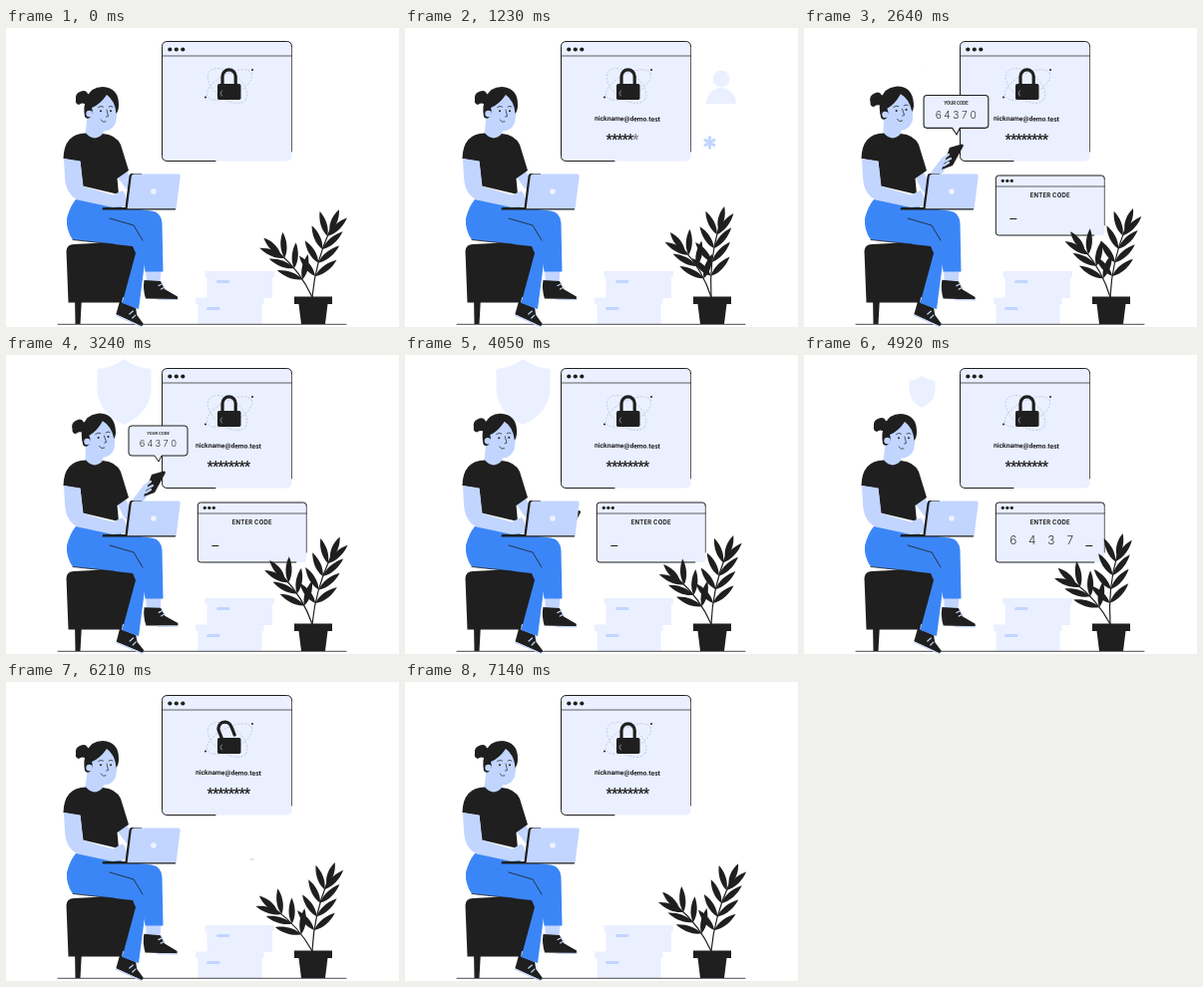
Recreate the animation shown at these times as an HTML page. Size 394x300 px, loop 7.17 s.

```html
<!DOCTYPE html>
<html lang="en">
<head>
<meta charset="utf-8">
<title>Two-step sign in</title>
<style>
  html, body { margin: 0; height: 100%; overflow: hidden; background: #fff; }
  svg { display: block; width: 100vw; height: 100vh; }
  text { font-family: Inter, Roboto, sans-serif; fill: #1f1f1f; text-anchor: middle; }
  .ink { fill: #1f1f1f; }
  .skin { fill: #c2d5ff; }
  .pale { fill: #eaf0ff; }
  .blue { fill: #3b86f7; }
  .line { fill: none; stroke: #1f1f1f; stroke-linecap: round; stroke-linejoin: round; }
  .trim { fill: none; stroke: #c2d5ff; stroke-linecap: round; }
  .orbit { fill: none; stroke: #a9b5d0; stroke-width: .6; stroke-dasharray: 2 1.5; }
  .bold { font-weight: 700; }
  .thin text { font-weight: 300; fill: #333; }
  #mail, #stars text { font-family: Roboto, Inter, sans-serif; }
</style>
</head>
<body>
<svg viewBox="0 0 394 300">
  <path id="shield" class="pale" d="M0-33Q12-24 27-23V-3Q26 21 0 33Q-26 21-27-3V-23Q-12-24 0-33Z"/>

  <!-- login window -->
  <rect class="pale" x="156.5" y="13.5" width="130" height="120" rx="5"/>
  <path class="line" d="M210 133.5H162Q156.5 133.5 156.5 128.5V18.5Q156.5 13.5 162 13.5H281.5Q286.5 13.5 286.5 18.5"/>
  <path class="line" stroke-width=".7" d="M286.5 18.5V124M157 28H286.5"/>
  <g class="ink">
    <circle cx="164.3" cy="21.5" r="2.1"/><circle cx="170.8" cy="21.5" r="2.1"/><circle cx="177.3" cy="21.5" r="2.1"/>
    <circle cx="247" cy="42" r="1"/><circle cx="200" cy="69.5" r="1"/>
  </g>
  <ellipse class="orbit" cx="224" cy="57" rx="25" ry="11" transform="rotate(-28 224 57)"/>
  <ellipse class="orbit" cx="222" cy="58" rx="23" ry="13" transform="rotate(38 222 58)"/>
  <path id="shackle" class="line" stroke-width="3.2" d="M217 58V48.5A6.6 6.6 0 0 1 230.2 48.5V58"/>
  <rect class="ink" x="212" y="56" width="23.5" height="16" rx="1.8"/>
  <path class="trim" stroke-width=".6" d="M216.5 63L215 65.5 216.5 68"/>
  <text id="mail" class="bold" x="223" y="93.3" font-size="6.7" transform="rotate(.8 223 91)">nickname@demo.test</text>
  <g id="stars" class="bold" font-size="14"></g>

  <!-- user badge and asterisks -->
  <g id="user" class="pale"><circle cy="-7" r="8.5"/><path d="M-15 18Q-14 3 0 2Q14 3 15 18Z"/></g>
  <g id="marks" stroke="#c2d5ff" stroke-width="3"></g>

  <!-- code window -->
  <g id="codeBox">
    <rect class="pale" x="-54.5" y="-30" width="109" height="60" rx="3"/>
    <path class="line" d="M44 30H-51.500Q-54.5 30-54.5 27V-27Q-54.5-30-51.5-30H51.5Q54.5-30 54.5-27"/>
    <path class="line" stroke-width=".7" d="M54.5-27V20M-54.5-19H54.5"/>
    <g class="ink"><circle cx="-47.5" cy="-24.7" r="1.6"/><circle cx="-43" cy="-24.7" r="1.6"/><circle cx="-38.5" cy="-24.7" r="1.6"/></g>
    <text class="bold" y="-8.3" font-size="5.9" letter-spacing=".25">ENTER CODE</text>
    <g id="digits" class="thin" font-size="11.8"></g>
    <path id="cursor" stroke="#1f1f1f" d="M-3.5 13.5H3.5"/>
  </g>

  <!-- boxes -->
  <g class="pale">
    <path d="M199.5 244H269V250H267V271H201.5V250H199.5Z"/>
    <path d="M190 270.5H258.5V277H256.5V297H192.5V277H190Z"/>
  </g>
  <path class="trim" stroke-width="3" d="M212.5 254.5H223M202.5 281.5H213"/>

  <!-- plant -->
  <g id="plant" class="ink" transform="translate(307 270)"></g>
  <path class="ink" d="M289 269.5H327V277H322.5L320 297H296L293.5 277H289Z"/>
  <path class="line" stroke="#555" stroke-width=".8" d="M52 297.3H341"/>

  <!-- stool -->
  <path class="ink" d="M69 270H76L74.5 297H69.5ZM60.5 224Q61 217 68 217L125 214 132 225 123 275.500H62.5Z"/>

  <!-- legs -->
  <g id="farFoot">
    <path class="skin" d="M140 242H155.5L154.5 257H141Z"/>
    <path class="ink" d="M138.500 253L155 254 159 262 172 269.5V272L140 271.5Q137 262 138.500 253Z"/>
    <path class="trim" stroke-width="1.2" d="M152 272.5H172M153 258.5L157 256.5M155.500 262L159 260"/>
  </g>
  <path class="blue" d="M100 178L146 183.5Q156 185 156.5 196L157.5 244.5H139.5L135 212 110 205Z"/>
  <g id="nearFoot">
    <path class="skin" d="M117 270L134 275 130 286 115 282Z"/>
    <path class="ink" d="M114 274.5L130 281 131.5 288 138 296.5 136.500 299 110.5 287.5Z"/>
    <path class="trim" stroke-width="1.2" d="M110.5 288.3L136 299.5M124 287L127.500 284M127 291L130 288"/>
  </g>
  <path class="blue" d="M70 172L112 175 128 194 137 213Q140 222 139 236L133 282 116.500 276 130 226 127 219 67 212.5Q60 203 61 191 64 179 70 172Z"/>
  <path class="line" stroke-width=".8" d="M67 212.5L108 217 129 225M104 191L128 198 137 213"/>

  <!-- far arm with phone -->
  <path id="arm" fill="none" stroke="#c2d5ff" stroke-linejoin="round" stroke-linecap="round"/>
  <g id="phone">
    <path class="ink" d="M4-13L16-16.500Q18.500-16.500 17.500-14L7 5-4 9Z"/>
    <path class="trim" stroke-width="2.2" d="M-4-1L3-6M-3 2L5-2M-2 5L3 2"/>
  </g>

  <!-- head -->
  <g id="head">
    <path class="skin" d="M82 86L98 98 97 109Q89 118 79 109Z"/>
    <path class="skin" d="M81 76Q94 62 109 70 113 82 110 95 106 104.500 96 103.500 85 100 80 88Z"/>
    <path class="ink" d="M79 89Q77 78 81 70 85 59 97 59 113 60 113 77 113 83 110.500 86 109.500 73 101 67 94 77 86 80 88 86 84 90 81 92 79 89Z"/>
    <path class="ink" d="M70 72Q69 66 74 64 80 61 82 66L85 67 81 77Q76 74 73 77 69 76 70 72Z"/>
    <circle class="skin" cx="83.5" cy="86" r="3.2"/>
    <g class="ink"><circle cx="95" cy="83.3" r="1"/><circle cx="105" cy="83.300" r="1"/></g>
    <path class="line" stroke-width=".7" d="M92.5 79.5Q95 77.5 97.5 79M103 79Q105 77.5 107 79M101 82L102.5 88.5 100.5 89M95 92Q97 95.5 100 94"/>
  </g>

  <path class="ink" d="M80 105.5Q89 115 97 106 110 107 115 117L123 143 111.5 151 113 167 77 158.5 74.5 134 57.5 131Q58 106 80 105.5Z"/>
  <path id="nearArm" class="skin"/>

  <!-- laptop -->
  <path class="ink" d="M126 146H136V182H97V180H119.5L123.5 149Q124 146 126 146Z"/>
  <path class="skin" d="M129 146.5H172.5Q175 146.5 174.7 149L170.5 182H121.5L125.7 149Q126 146.5 129 146.5Z"/>
  <path class="line" stroke-width="1.3" d="M97 181.8H169.5"/>
  <circle fill="#eef3ff" cx="148" cy="164" r="2.8"/>

  <!-- message bubble -->
  <g id="bubble">
    <path class="pale" stroke="#1f1f1f" d="M-27-36H26Q29-36 29-33V-9Q29-6 26-6H3L0 0-4-6H-27Q-30-6-30-9V-33Q-30-36-27-36Z"/>
    <text class="bold" x="-.5" y="-27.5" font-size="3.8">YOUR CODE</text>
    <g id="sms" class="thin" font-size="9.3"></g>
  </g>
</svg>
<script>
const LOOP = 7170, CODE = [...'64370'];
const $ = id => document.getElementById(id);
const set = (el, key, value) => el.setAttribute(key, value);
const fill = (id, html) => [...($(id).innerHTML = html, $(id).children)];
const row = (n, draw) => Array.from({ length: n }, (_, i) => draw(i)).join('');

const stars = fill('stars', row(8, i => `<text x="${204.8 + i * 5.3}" y="116.6">*</text>`));
const marks = fill('marks', row(3, () => '<path d="M0-6.5V6.5M-5.6-3.25L5.6 3.25M-5.6 3.25L5.6-3.25"/>'));
const digits = fill('digits', row(5, i => `<text x="${-37 + i * 19}" y="12.3">${CODE[i]}</text>`));
fill('sms', row(5, i => `<text x="${-16.5 + i * 7.9}" y="-15">${CODE[i]}</text>`));

const leaf = (x, y, angle, len) => `<path d="M0 0C4.500 ${-len * .3} 3.600 ${-len * .7} 0 ${-len}C-3.600 ${-len * .7} -4.500 ${-len * .3} 0 0"
  transform="translate(${x} ${-y}) rotate(${angle})"/>`;

// A stem that bows outward; side is 1 for a right-hand stem, -1 for a left-hand one.
const stem = (height, pairs, side) => '<g>' +
  `<path class="line" stroke-width="1.2" d="M0 0Q${-side * 6} ${-height / 2} 0 ${-height}"/>` +
  leaf(0, height - 2, side * 8, 24) +
  row(pairs, i => {
    const y = height - 7 - i * 14, u = y / height;
    const x = -side * 12 * u * (1 - u), tilt = side * 10 * (2 * u - 1);
    return leaf(x, y, tilt + side * (24 + 6 * i), 27) + leaf(x, y, tilt - side * (40 + 3 * i), 26);
  }) + '</g>';
const [leftStem, rightStem] = fill('plant', stem(55, 3, -1) + stem(70, 4, 1));

const part = (t, from, to) => Math.min(1, Math.max(0, (t - from) / (to - from)));
const smooth = u => u * u * (3 - 2 * u);
const back = u => 1 + 2.7 * (u - 1) ** 3 + 1.7 * (u - 1) ** 2;
// Ease in over [a, b], hold, then ease out over [c, d].
const hold = (ease, t, a, b, c, d) => ease(Math.min(part(t, a, b), 1 - part(t, c, d)));
const place = (el, x, y, s) => {
  set(el, 'transform', `translate(${x} ${y}) scale(${Math.max(0, s)})`);
  set(el, 'visibility', s > .002 ? 'visible' : 'hidden');
};
const turn = (el, angle, x = 0, y = 0) => set(el, 'transform', `rotate(${angle} ${x} ${y})`);

function draw(t) {
  const phase = t / LOOP * Math.PI * 2;

  turn(rightStem, 10.5 + 5 * Math.cos(2 * phase + .47));
  turn(leftStem, -35 + 7 * Math.sin(phase - .26));
  turn($('farFoot'), Math.sin(6 * phase), 147, 246);
  turn($('nearFoot'), Math.sin(6 * phase + 1), 124, 276);

  $('mail').style.opacity = part(t, 250, 550);
  stars.forEach((s, i) => s.style.opacity = part(t, 680 + i * 100, 780 + i * 100));
  turn($('shackle'), -22 * hold(smooth, t, 5400, 5700, 6600, 6900), 217, 58);

  place($('user'), 317, 58, hold(back, t, 500, 900, 2250, 2550));
  marks.forEach((m, i) => {
    const start = 950 + i * 320;
    place(m, 305.5 + i * 14.3, 115, hold(back, t, start, start + 280, 2250, 2550));
  });
  place($('shield'), 118.5, 37, hold(smooth, t, 2600, 3130, 4650, 5180));

  place($('codeBox'), 246.8, 178, hold(back, t, 1760, 2200, 5774, 6214));
  const typed = Math.min(5, Math.max(0, Math.floor((t - 4120) / 180)));
  digits.forEach((d, i) => set(d, 'visibility', i < typed ? 'inherit' : 'hidden'));
  set($('cursor'), 'transform', `translate(${-37 + typed * 19} 0)`);
  set($('cursor'), 'visibility', typed < 5 ? 'inherit' : 'hidden');

  // The hand swings out behind the laptop on its way up.
  const r = hold(smooth, t, 1850, 2400, 3700, 4250), q = 1 - r;
  const curve = (a, b, c) => q * q * a + 2 * q * r * b + r * r * c;
  const x = curve(147, 175, 142), y = curve(175, 168, 133);
  set($('arm'), 'd', `M115 145L${124 - 2 * r} ${157 + 3 * r}L${x - 3 * r} ${y + 4 * r}`);
  set($('arm'), 'stroke-width', 11 - 1.5 * r);
  set($('phone'), 'transform', `translate(${x} ${y + 6 * q})`);
  set($('phone'), 'visibility', r > .01 ? 'visible' : 'hidden');
  turn($('head'), -6 * r, 91, 106);
  place($('bubble'), 153, 107, hold(back, t, 2450, 2800, 3600, 3900));

  const tap = .8 * Math.sin(24 * phase) * q;
  set($('nearArm'), 'd', `M58 131L74.5 133.5 77.5 159 107 167.5 117 ${163 + tap}Q124 ${172 + tap} 119 ${179 + tap}L107 180 72 172.5Q60 167 59 150Z`);
}

function tick() {
  draw(performance.now() % LOOP);
  requestAnimationFrame(tick);
}
tick();
</script>
</body>
</html>
```
